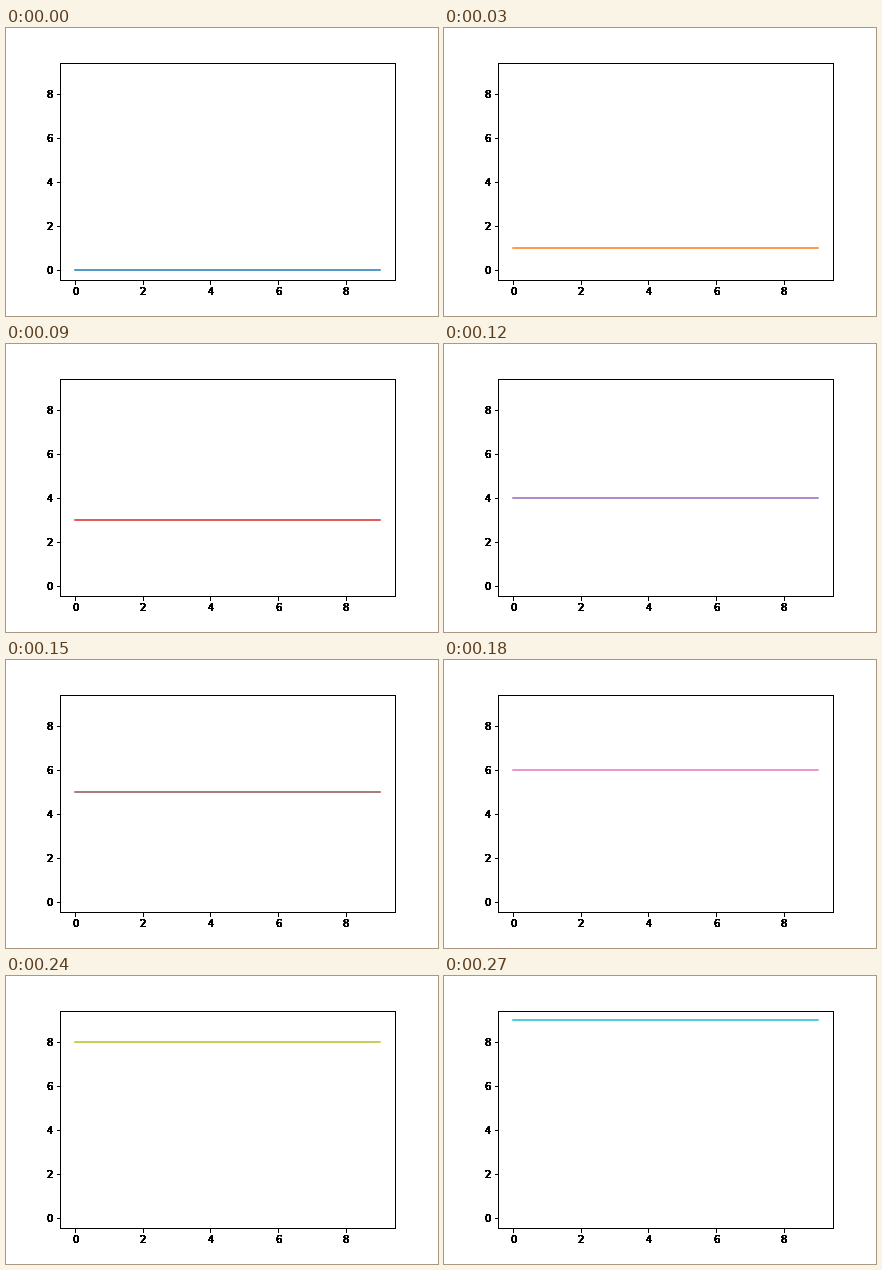
Write a matplotlib script that moves like this. It is 432x288 px and loops after 300 ms.

```python
import matplotlib.pyplot as plt
from matplotlib.animation import ArtistAnimation

N = 10
INK_LAYERS = 24
LIMITS = (-0.45, 9.45)

plt.rcParams["font.family"] = "DejaVu Sans"
plt.rcParams["font.size"] = 10

fig = plt.figure(figsize=(6, 4), dpi=72, facecolor="white")
box = [0.125, 0.125, 0.775, 0.755]


def add_frame(layer):
    ax = fig.add_axes(box, label=f"layer {layer}", facecolor="none")
    ax.set(xlim=LIMITS, ylim=LIMITS,
           xticks=range(0, N, 2), yticks=range(0, N, 2))
    return ax


# Stacked copies of the frame turn soft edges into solid black ink.
axes = [add_frame(layer) for layer in range(INK_LAYERS)]

lines = [axes[0].plot(range(N), [level] * N, color=f"C{level}", lw=1.5)
         for level in range(N)]

anim = ArtistAnimation(fig, lines, interval=30, repeat=True, blit=False)
plt.show()
```
